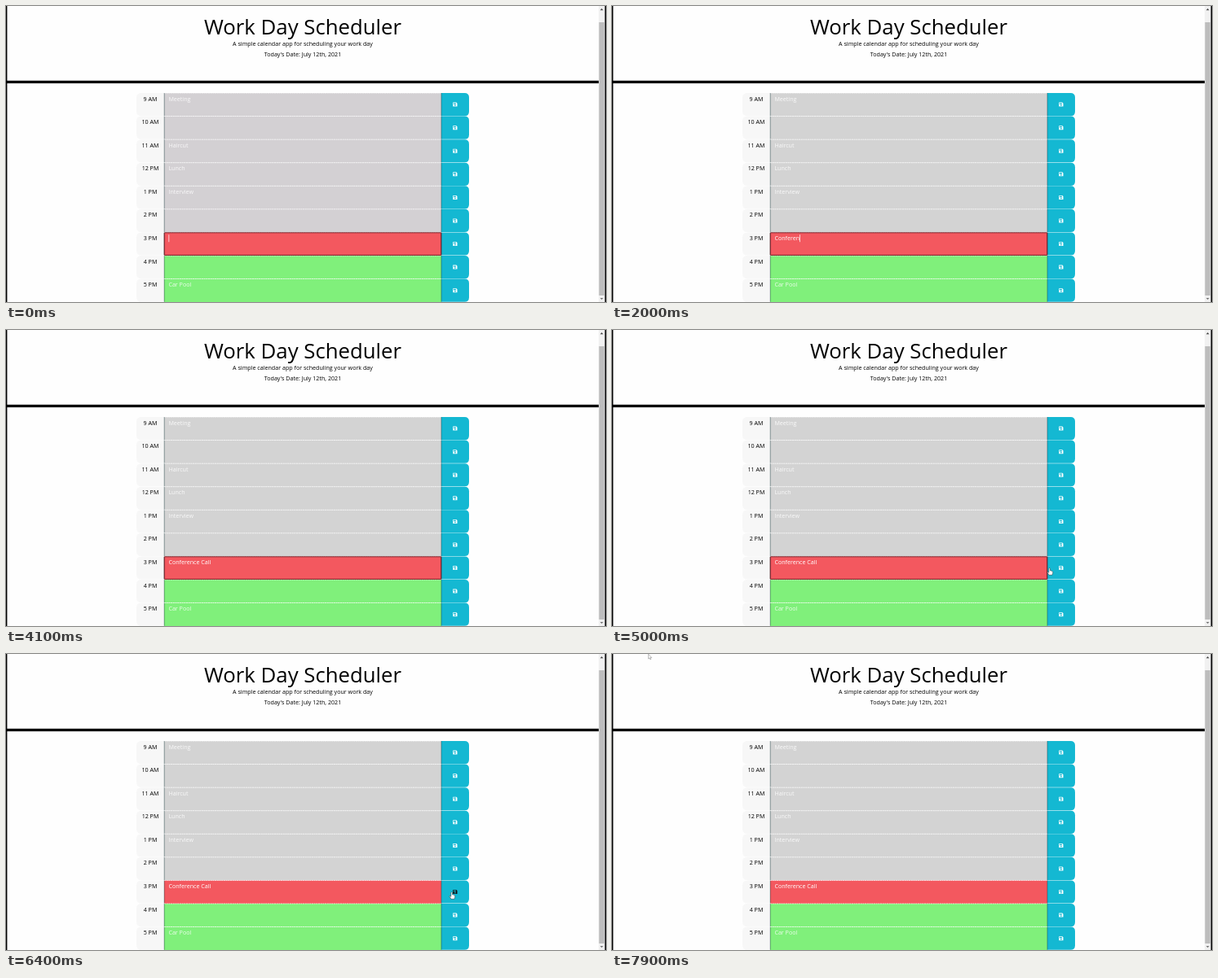
An HTML page that plays this animation: 736 px wide and 364 px high, repeating every 8 s.

```html
<!DOCTYPE html>
<html lang="en">
<head>
<meta charset="utf-8">
<title>Work Day Scheduler</title>
<style>
  html, body { margin: 0; width: 100%; height: 100%; overflow: hidden; background: #fff; }
  svg { display: block; width: 736px; height: 364px; }
  text { font-family: "Open Sans", sans-serif; font-size: 7.14px; }
  .mid { text-anchor: middle; }
  .hour { font-weight: 500; }
  .entry { fill: #fff; }
</style>
</head>
<body>
<svg id="stage" viewBox="0 0 736 364" xmlns="http://www.w3.org/2000/svg">
  <rect width="736" height="364" fill="#fefefe"/>
  <text class="mid" x="364" y="34.8" style="font-size:25.75px">Work Day Scheduler</text>
  <text class="mid" x="364" y="49.2">A simple calendar app for scheduling your work day</text>
  <text class="mid" x="364" y="62">Today's Date: July 12th, 2021</text>
  <rect y="91.8" width="727" height="3.3"/>
  <g id="rows"></g>
  <rect id="focus" x="194.2" y="278.8" width="339.6" height="27.6" rx=".6" fill="none" stroke="#6e1a22" stroke-width=".9"/>
  <rect id="caret" y="281.2" width=".7" height="9" fill="#fff"/>
  <rect width="1.4" height="364"/>
  <g id="scrollbar">
    <rect x="727" width="7.4" height="364" fill="#f1f1f1"/>
    <rect x="727.4" y="20" width="6.4" height="336" fill="#bdbdbd"/>
    <path d="M728.8 5.2l1.9-2.2 1.9 2.2z" fill="#444"/>
    <path d="M728.8 359l1.9 2.2 1.9-2.2z" fill="#777"/>
    <rect x="734.6" width="1.4" height="364"/>
  </g>
  <path id="hand" fill="#fff" stroke="#222" stroke-width=".45" stroke-linejoin="round"
    d="M-.8 .5Q0-.6 .8 .5V3.2L2 3.4 3.2 3.8 4 4.6V6.6L3.2 8.6H-.7L-2.6 5.6Q-2.7 4.6-1.8 4.8L-.8 5.7Z"/>
  <path id="arrow" fill="#fff" stroke="#777" stroke-width=".5" d="M0 0V5.8L1.3 4.6 2.2 6.6 3.1 6.2 2.2 4.3H4Z"/>
</svg>
<script>
const LOOP = 8000, TOP = 107, PITCH = 28.57, NOW = 6;
const PHRASE = "Conference Call";
const KEYS = [900, 950, 1000, 1150, 1600, 1720, 1840, 1960, 2120, 2280, 2520, 2760, 2960, 3150, 3300];
const HOURS = ["9 AM", "10 AM", "11 AM", "12 PM", "1 PM", "2 PM", "3 PM", "4 PM", "5 PM"];
const PLANS = ["Meeting", "", "Haircut", "Lunch", "Interview", "", "", "", "Car Pool"];

const $ = id => document.getElementById(id);
function add(tag, attrs, text = "") {
  const el = document.createElementNS("http://www.w3.org/2000/svg", tag);
  for (const k in attrs) el.setAttribute(k, attrs[k]);
  el.textContent = text;
  return $("rows").appendChild(el);
}

const past = [], icons = [], entries = [];
HOURS.forEach((hour, i) => {
  const y = TOP + i * PITCH, h = PITCH - .4, b = y + h;
  add("path", { d: `M194 ${y}H166Q160 ${y} 160 ${y + 6}V${b - 6}Q160 ${b} 166 ${b}H194Z`, fill: "#f7f7f7" });
  const fill = i < NOW ? "#d3d3d3" : i === NOW ? "#f3585f" : "#80f07b";
  const box = add("rect", { x: 194, y, width: 340, height: PITCH, fill });
  if (i < NOW) past.push(box);
  add("path", { d: `M534 ${y}H562.5Q568 ${y} 568 ${y + 5.5}V${b - 5.5}Q568 ${b} 562.5 ${b}H534Z`, fill: "#14b8d2" });
  add("path", { d: `M194 ${y}H534`, stroke: "#fff", "stroke-width": .8, "stroke-dasharray": "2 .7", opacity: .85 });
  add("path", { d: `M194.2 ${y}V${b}M534 ${y}V${b}`, stroke: "#1b3a40", "stroke-width": .7, opacity: .65 });
  add("text", { x: 177, y: y + 9.6, class: "mid hour" }, hour);
  entries.push(add("text", { x: 199.4, y: y + 9.6, class: "entry", opacity: i === NOW ? 1 : .85 }, PLANS[i]));
  // floppy disk with shutter and label cut out
  const c = y + 14.1;
  icons.push(add("path", {
    d: `M548.3 ${c - 2.5}H552.4L553.5 ${c - 1.4}V${c + 2.5}H548.3ZM549 ${c - 1.7}V${c - .4}H552V${c - 1.7}ZM550 ${c + 1}a.9 .9 0 1 0 1.8 0a.9 .9 0 1 0-1.8 0Z`,
    fill: "#fff", "fill-rule": "evenodd"
  }));
});

const show = (el, on) => el.setAttribute("visibility", on ? "visible" : "hidden");
const ease = (t, a, b) => {
  const p = Math.min(1, Math.max(0, (t - a) / (b - a)));
  return p * p * (3 - 2 * p);
};
const place = (el, x, y) => el.setAttribute("transform", `translate(${x.toFixed(2)} ${y.toFixed(2)})`);

function caretOn(t, typed) {
  if (t >= 5600) return false;
  if (!typed) return t < 100 || t >= 500;
  return Math.floor((t - KEYS[typed - 1]) / 500) % 2 === 0;
}

function draw(t) {
  const typed = KEYS.filter(k => k <= t).length;
  const entry = entries[NOW];
  const str = PHRASE.slice(0, typed);
  if (entry.textContent !== str) entry.textContent = str;
  const width = typed ? entry.getComputedTextLength() : 0;
  $("caret").setAttribute("x", 199.5 + width);
  show($("caret"), caretOn(t, typed));
  show($("focus"), t < 5600);

  past.forEach(r => r.setAttribute("fill", t < 1600 ? "#d3d0d3" : "#d3d3d3"));
  icons[NOW].setAttribute("fill", t >= 5300 && t < 6450 ? "#111" : "#fff");

  const leave = ease(t, 6400, 6900), up = ease(t, 7150, 7400);
  const x = 536.7 + 10 * ease(t, 5050, 5400) - 502 * leave;
  const y = 292.7 - 280 * leave - 12.5 * up;
  const onButton = x >= 534;
  place($("hand"), x, y);
  place($("arrow"), x, y);
  show($("hand"), t >= 4800 && onButton);
  show($("arrow"), t >= 4800 && !onButton);
}

const start = performance.now();
function tick() {
  draw((performance.now() - start) % LOOP);
  requestAnimationFrame(tick);
}
draw(0);
requestAnimationFrame(tick);
</script>
</body>
</html>
```
